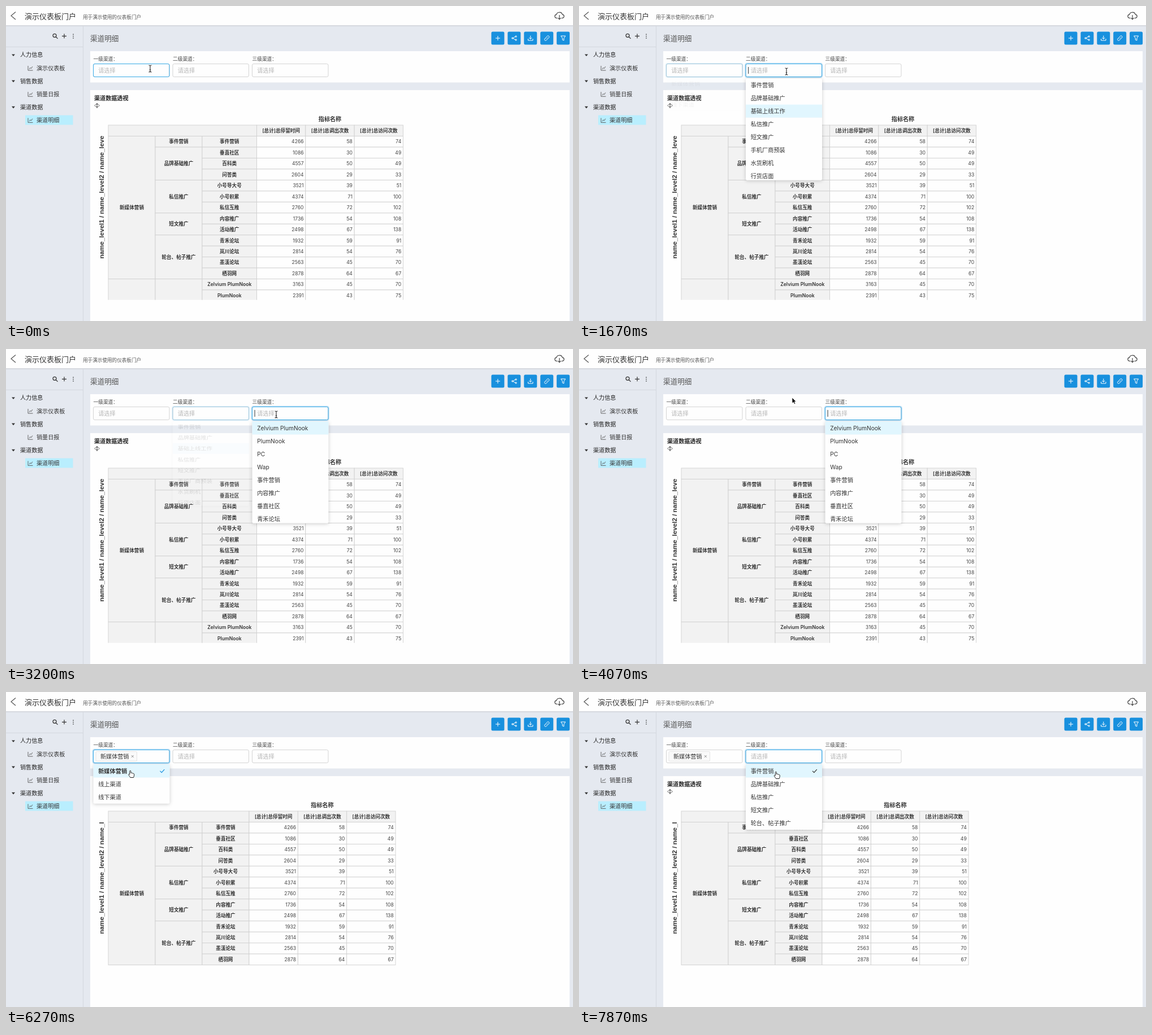
Recreate the animation shown at these times as an HTML page. Size 1003x558 px, loop 8000 ms.

```html
<!DOCTYPE html>
<html lang="zh">
<head>
<meta charset="utf-8">
<title>仪表板</title>
<style>
html, body { margin: 0; width: 100%; height: 100%; overflow: hidden; background: #e5e9f0 }
svg { display: block; width: 100%; height: 100% }
text { font-family: Inter, "Noto Sans CJK SC", "Noto Sans CJK", sans-serif; white-space: pre }
.panel { filter: drop-shadow(0 1.5px 3px rgba(0, 0, 0, .2)) }
</style>
</head>
<body>
<svg id="stage" viewBox="0 0 1003 558"></svg>
<script>
const BLUE = '#1890de';
const FIELD_X = [154.5, 295, 435.5], FIELD_W = 134.5, ITEM_H = 23.1, LIST_Y = 128.4;

// Markup helpers; text is centred vertically on y
const text = (x, y, s, size, fill = '#444', weight = 400, anchor = 'start') =>
  `<text x="${x}" y="${y + size * .37}" font-size="${size}" fill="${fill}" font-weight="${weight}" text-anchor="${anchor}">${s}</text>`;
const rect = (x, y, w, h, fill, more = '') =>
  `<rect x="${x}" y="${y}" width="${w}" height="${h}" fill="${fill}" ${more}/>`;
const line = (d, stroke = '#444', width = 1, more = '') =>
  `<path d="${d}" fill="none" stroke="${stroke}" stroke-width="${width}" ${more}/>`;
const at = (x, y, s) => `<g transform="translate(${x} ${y})">${s}</g>`;
const group = (id, s, more = '') => `<g id="${id}" ${more}>${s}</g>`;

const icons = {
  plus: 'M-4 0H4M0-4V4',
  share: 'M2.5-3L-2.5 0L2.5 3M2-3a1.2 1.2 0 1 0 2.4 0a1.2 1.2 0 1 0-2.4 0M2 3a1.2 1.2 0 1 0 2.4 0a1.2 1.2 0 1 0-2.4 0M-4.2 0a1.2 1.2 0 1 0 2.4 0a1.2 1.2 0 1 0-2.4 0',
  download: 'M0-4.5V1.5M-2.5-1L0 1.5L2.5-1M-4.2 1V4H4.2V1',
  link: 'M-1 1.3C-2.2 0-1.9-1-1-1.9L.8-3.7C2.9-5.3 5.3-2.9 3.7-.8L2.5.4M1-1.3C2.2 0 1.9 1 1 1.9L-.8 3.7C-2.9 5.3-5.3 2.9-3.7.8L-2.5-.4',
  filter: 'M-4-4H4L1.3 0V4L-1.3 3V0Z',
  cloud: 'M-3.5 4H-4.5C-9.5 3.5-9-2-5.2-2.3C-4.5-7.5 4-7.7 5.2-2.3C9.2-2 9.3 3.6 4.5 4H3.5M0-1.5V6M-2.5 3.6L0 6.2L2.5 3.6',
  chart: 'M-4-4V4H4.5M-1.8 2L0-.8L1.6.8L3.8-2.8',
  move: 'M-4.5 0C-2-2.8 2-2.8 4.5 0C2 2.8-2 2.8-4.5 0M0-4V4M-1.5-2.8L0-4.2L1.5-2.8M-1.5 2.8L0 4.2L1.5 2.8'
};

function chrome() {
  let s = rect(0, 0, 1003, 558, '#e5e9f0') + rect(0, 34, 1003, 2, '#d6d9df') + rect(0, 0, 1003, 34, '#fefefe') +
    line('M17 10.5L9 17.3L17 24', '#555', 1.2) +
    text(33, 18, '演示仪表板门户', 13, '#333') + text(136, 20.3, '用于演示使用的仪表板门户', 8.6, '#555') +
    at(979, 17.5, line(icons.cloud, '#444', 1.2)) +
    line('M136.5 36V558M0 72.5H136', '#d3d7de') +
    line('M83 52.3a3 3 0 1 0 6 0a3 3 0 1 0-6 0M88.2 54.5L91.5 57.8', '#333', 1.2) +
    at(103, 53.3, line(icons.plus, '#333', 1.2)) +
    line('M119 49.6v1.4M119 52.8v1.4M119 56v1.4', '#333', 1.4) +
    rect(34, 193.5, 84.5, 17, '#b9eefe');
  [['人力信息', '演示仪表板'], ['销售数据', '销量日报'], ['渠道数据', '渠道明细']].forEach(([head, child], i) => {
    const y = 86.7 + i * 46.2;
    s += `<path d="M10 ${y - 1.3}h6l-3 3.6z" fill="#333"/>` + text(25, y, head, 10.1, '#222', 500) +
      at(43, y + 23.3, line(icons.chart, '#555', .9)) + text(54, y + 23.2, child, 10.1, '#333');
  });
  s += text(149, 57, '渠道明细', 12.6, '#555');
  ['plus', 'share', 'download', 'link', 'filter'].forEach((name, i) => {
    const x = 870 + i * 28.9;
    s += rect(x - 11.5, 45.5, 23, 23, BLUE, 'rx="2.5"') + at(x, 57, line(icons[name], '#fff', 1));
  });
  return s + rect(149, 80, 848, 55.5, '#fefefe') + rect(149, 149, 848, 409, '#fefefe') +
    text(156, 163, '渠道数据透视', 10.1, '#222', 700) + at(161, 176.3, line(icons.move, '#444', .8));
}

const rows = [
  ['事件营销', 4266, 58, 74], ['垂直社区', 1086, 30, 49], ['百科类', 4557, 50, 49],
  ['问答类', 2604, 29, 33], ['小号导大号', 3521, 39, 51], ['小号积累', 4374, 71, 100],
  ['私信互推', 2760, 72, 102], ['内容推广', 1736, 54, 108], ['活动推广', 2498, 67, 138],
  ['青禾论坛', 1932, 59, 91], ['岚川论坛', 2814, 54, 76], ['墨溪论坛', 2563, 45, 70],
  ['栖羽网', 2878, 64, 67], ['Zelvium PlumNook', 3163, 45, 70], ['PlumNook', 2391, 43, 75]
];
const groups = [['事件营销', 1], ['品牌基础推广', 3], ['私信推广', 3], ['短文推广', 2], ['轮台、帖子推广', 4], ['', 3]];

function table(id, nameEnd, count, axis, axisY) {
  const xs = [181, 264, 347];
  for (let i = 0; i < 4; i++) xs.push(nameEnd + i * 86.35);
  const top = 230.5, rowH = 19.46;
  const cell = (c, end, y, h, s, head) =>
    rect(xs[c], y, xs[end] - xs[c], h, head ? '#f2f2f2' : '#fefefe', 'stroke="#d0d0d0" stroke-width=".9"') +
    (head ? text((xs[c] + xs[end]) / 2, y + h / 2, s, 8.6, '#333', 600, 'middle')
          : text(xs[end] - 3.3, y + h / 2, s, 8.6, '#444', 400, 'end'));
  let s = cell(0, 3, 211, 19.5, '', true);
  ['停留时间', '调出次数', '访问次数'].forEach((n, i) => s += cell(3 + i, 4 + i, 211, 19.5, '[总计]总' + n, true));
  s += cell(0, 1, top, 13 * rowH, '新媒体营销', true);
  if (count > 13) s += cell(0, 1, top + 13 * rowH, 3 * rowH, '', true);
  let r = 0;
  for (const [name, n] of groups) {
    if (r < count) s += cell(1, 2, top + r * rowH, n * rowH, name, true);
    r += n;
  }
  rows.slice(0, count).forEach((row, i) =>
    row.forEach((v, c) => s += cell(2 + c, 3 + c, top + i * rowH, rowH, v, !c)));
  return group(id, text((xs[3] + xs[6]) / 2, 200.5, '指标名称', 10.1, '#333', 700, 'middle') +
    `<g clip-path="url(#tableClip)">${s}</g><g clip-path="url(#axisClip)">
    <text transform="translate(173 ${axisY}) rotate(-90)" font-size="11.67" font-weight="700" fill="#333"
    style="font-family:'Liberation Sans',Arial,sans-serif">${axis}</text></g>`);
}

function field(i) {
  const x = FIELD_X[i], box = `rx="2.5" stroke-width="1"`;
  return text(x, 93.5, '一二三'[i] + '级渠道：', 8.7, '#444') +
    group('glow' + i, rect(x - 1, 101.5, FIELD_W + 2, 25, 'none', `rx="3.5" stroke="${BLUE}" stroke-opacity=".25" stroke-width="2"`)) +
    rect(x, 102.5, FIELD_W, 23, '#fefefe', box + ' stroke="#d4d4d4"') +
    group('edge' + i, rect(x, 102.5, FIELD_W, 23, 'none', box + ' stroke="#36a9e6"')) +
    group('hint' + i, text(x + 8.7, 114, '请选择', 10.2, '#b5b5b5')) +
    group('caret' + i, line(`M${x + 4.6} 108V120`, '#333', 1));
}

// Each list: field, active item, opening and closing time
const channels = ['新媒体营销', '线上渠道', '线下渠道'];
const lists = [
  { f: 0, active: 0, on: 790, off: 1470, items: channels },
  { f: 1, active: 2, on: 1470, off: 3010, items: ['事件营销', '品牌基础推广', '基础上线工作', '私信推广', '短文推广', '手机厂商预装', '水货刷机', '行货店面'] },
  { f: 2, active: 0, on: 3010, off: 4330, items: ['Zelvium PlumNook', 'PlumNook', 'PC', 'Wap', '事件营销', '内容推广', '垂直社区', '青禾论坛'] },
  { f: 0, active: 0, on: 5386, off: 6720, items: channels },
  { f: 1, active: 0, on: 7290, off: 9000, items: groups.slice(0, 5).map(g => g[0]) }
];
const PICK = 6000, RELOAD = 6130;

function panel(l, i) {
  const x = FIELD_X[l.f], h = Math.min(l.items.length * ITEM_H, 180.3);
  let s = rect(x, LIST_Y, FIELD_W + .5, h, '#fefefe', 'rx="2.5" class="panel"') +
    rect(x, LIST_Y + l.active * ITEM_H, FIELD_W + .5, ITEM_H, '#e1f6fe');
  l.items.forEach((n, k) => s += `<g id="item${i}_${k}">` +
    text(x + 8.7, LIST_Y + (k + .5) * ITEM_H, n, 10.2, '#333') + '</g>');
  const y = LIST_Y + ITEM_H / 2;
  return group('list' + i, s + line(`M${x + 118} ${y}l2.8 2.8l5-5.6`, '#333', 1.2, `id="check${i}"`));
}

const tag = rect(159, 105.5, 72.5, 17, '#fafafa', 'rx="1.5" stroke="#e4e4e4"') +
  text(167, 114, '新媒体营销', 10.1, '#333') + line('M221.8 112l4 4m0-4l-4 4', '#888', .9);

const cursors =
  group('beam', line('M-2.5-6Q0-6 0-4.5V4.5Q0 6-2.5 6M2.5-6Q0-6 0-4.5M0 4.5Q0 6 2.5 6M-1.2 2H1.2', '#fff', 2.4) +
    line('M-2.5-6Q0-6 0-4.5V4.5Q0 6-2.5 6M2.5-6Q0-6 0-4.5M0 4.5Q0 6 2.5 6M-1.2 2H1.2', '#222', 1.1)) +
  group('arrow', '<path d="M0 0V10.3L2.4 8.2L4 11.6L5.8 10.8L4.2 7.4H7.2Z" fill="#000" stroke="#fff" stroke-width=".8"/>') +
  group('hand', '<path d="M-1.2 6V.8C-1.2-.6.9-.6.9.8V4C1.4 3.3 2.7 3.4 2.9 4.4C3.6 3.8 4.7 4.1 4.8 5C5.7 4.6 6.7 5 6.7 6.2V8.3C6.7 10 5.7 10.6 5.6 12H-.2C-.4 10.6-2.7 8.7-3.2 7C-3.3 5.6-1.8 5.7-1.2 6.8Z" fill="#fff" stroke="#222" stroke-width="1"/>');

const stage = document.getElementById('stage');
stage.innerHTML = `<defs>
  <clipPath id="tableClip"><rect x="180" y="210" width="530" height="310.5"/></clipPath>
  <clipPath id="axisClip"><rect x="160" y="229" width="18" height="230"/></clipPath></defs>` +
  chrome() + table('wide', 443.5, 15, 'name_level1 / name_level2 / name_leve', 447.5) +
  table('narrow', 430, 13, 'name_level1 / name_level2 / name_l', 428.5) +
  [0, 1, 2].map(field).join('') + group('tag', tag) + lists.map(panel).join('') + group('cursor', cursors);

const el = {};
stage.querySelectorAll('[id]').forEach(e => el[e.id] = e);
const show = (id, on) => el[id].style.display = on ? '' : 'none';
const fade = (id, v) => el[id].setAttribute('opacity', v);
const clamp = v => Math.max(0, Math.min(1, v));

// Pointer hotspot: time, x, y
const path = [
  [0, 255, 111], [70, 255, 111], [600, 224, 116], [920, 224, 116], [1200, 367, 116], [2270, 367, 116],
  [2533, 469, 117], [2733, 478, 116], [3670, 478, 116], [4067, 377, 86], [4400, 377, 86], [4733, 208, 92],
  [4940, 208, 92], [5360, 224, 116.5], [5600, 224, 116.5], [5870, 220, 139.5], [6330, 220, 139.5],
  [6680, 330, 90], [6750, 330, 90], [7070, 352, 115], [7450, 352, 115], [7800, 348.5, 141.5], [8000, 348.5, 141.5]
];
const hovers = [[0, -400, 980], [1, 1000, 2440], [2, 2520, 3800], [0, 5150, 5700], [1, 6850, 7550]];

function pointer(t) {
  const i = Math.max(1, path.findIndex(k => k[0] > t));
  const [a, b] = [path[i - 1], path[i]];
  const u = clamp((t - a[0]) / (b[0] - a[0])), e = u * u * (3 - 2 * u);
  return [a[1] + (b[1] - a[1]) * e, a[2] + (b[2] - a[2]) * e];
}

// 300 ms fade in after `on` and out after `off`
const ramp = (t, on, off) => clamp((t - on) / 200) * (1 - clamp((t - off) / 300));

function draw(t) {
  const [x, y] = pointer(t);
  const inField = y > 102 && y < 127 && FIELD_X.some(f => x >= f && x <= f + FIELD_W);
  const kind = y > 128 ? 'hand' : inField ? 'beam' : 'arrow';
  ['beam', 'arrow', 'hand'].forEach(k => show(k, k === kind));
  el.cursor.setAttribute('transform', `translate(${x} ${y})`);

  const picked = t >= PICK;
  show('tag', picked);
  show('hint0', !picked);
  show('wide', t < RELOAD);
  show('narrow', t >= RELOAD);

  const edge = [0, 0, 0], glow = [0, 0, 0], caret = [false, false, false];
  for (const [f, on, off] of hovers) edge[f] = Math.max(edge[f], ramp(t, on, off));
  lists.forEach((l, i) => {
    const focus = ramp(t, l.on, l.off);
    glow[l.f] = Math.max(glow[l.f], focus);
    edge[l.f] = Math.max(edge[l.f], focus);
    if (t >= l.on && t < l.off && (t - l.on) % 1000 < 500) caret[l.f] = true;

    const opened = 1 - (1 - clamp((t - l.on) / 200)) ** 5;
    const p = opened * (1 - clamp((t - l.off) / 200) ** 3);
    show('list' + i, p > 0);
    fade('list' + i, p);
    el['list' + i].setAttribute('transform', `translate(0 ${LIST_Y}) scale(1 ${.8 + .2 * p}) translate(0 ${-LIST_Y})`);
    const chosen = i === 3 && picked;
    show('check' + i, chosen || (kind === 'hand' && t < l.off));
    el['check' + i].setAttribute('stroke', chosen ? BLUE : '#333');
  });
  el.item3_0.firstChild.setAttribute('font-weight', picked ? 600 : 400);
  for (let f = 0; f < 3; f++) {
    fade('edge' + f, edge[f]);
    fade('glow' + f, glow[f]);
    show('caret' + f, caret[f]);
  }
  el.caret0.setAttribute('transform', `translate(${picked ? 76 : 0} 0)`);
}

const start = performance.now();
function tick() {
  const t = (performance.now() - start) % 8000;
  draw(Math.floor((t + 5) * .015) / .015);
  requestAnimationFrame(tick);
}
tick();
</script>
</body>
</html>
```
